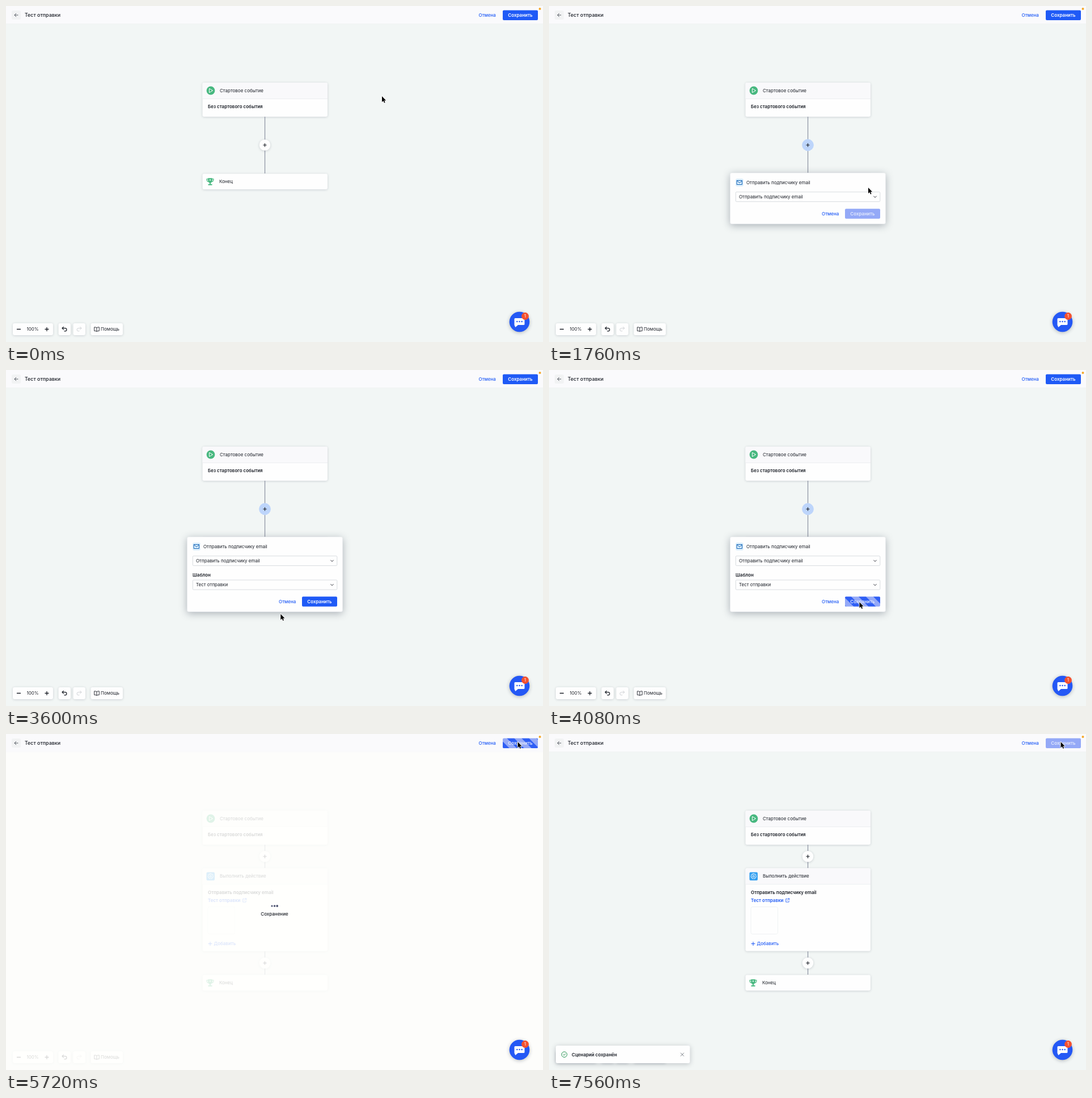
An HTML page with a canvas that plays this animation: 947 by 592 pixels, repeating every 8000 ms.

```html
<!DOCTYPE html>
<html lang="ru">
<head>
<meta charset="utf-8">
<style>
html, body { margin: 0; width: 100%; height: 100%; overflow: hidden; background: #f2f6f5; }
canvas { display: block; }
</style>
</head>
<body>
<canvas id="stage" width="947" height="592"></canvas>
<script>
const ctx = document.getElementById('stage').getContext('2d');
const LOOP = 8000, INK = '#1b1f27', BLUE = '#1f5af6', PALE = '#94a9f7', GREEN = '#48b880', GREY = '#989ca4';

const ICON = {
  mail: 'M-4.5-3.5h9v7h-9zM-4.5-3 0 .6 4.5-3',
  person: 'M-2.1-2.4a2.1 2.1 0 1 0 4.2 0a2.1 2.1 0 1 0-4.2 0M-4 4.5c0-5 8-5 8 0',
  hook: 'M-1.6-2.6a1.6 1.6 0 1 0 3.2 0a1.6 1.6 0 1 0-3.2 0M-4.6 2.4a1.6 1.6 0 1 0 3.2 0a1.6 1.6 0 1 0-3.2 0M1.4 2.4a1.6 1.6 0 1 0 3.2 0a1.6 1.6 0 1 0-3.2 0M-.6-1-2.2 1M.6-1 2.2 1M-1.4 2.4h2.8',
  sms: 'M-4.5-4h9v7h-6.5l-2.5 1.8zM-2.4-.5h.8M-.4-.5h.8M1.6-.5h.8',
  bell: 'M-4 2.4c2-2 0-6.6 4-6.6s2 4.6 4 6.6zM-1 4.3h2',
  home: 'M-4.5-.5 0-4 4.5-.5V4h-9z',
  plus: 'M-3 0H3M0-3V3',
  minus: 'M-3 0H3',
  check: 'M-2 0-.5 1.5 2-1.5',
  pencil: 'M-1.4 1.4 1.4-1.4',
  cross: 'M-2.7-2.7 2.7 2.7M2.7-2.7-2.7 2.7',
  chevron: 'M-2.3-1.2 0 1.2 2.3-1.2',
  back: 'M3 0H-3M-.2-2.8-3 0-.2 2.8',
  undo: 'M-1.6-4.2-4-1.8-1.6.6M-4-1.8H1.3a2.6 2.6 0 0 1 0 5.2H0',
  redo: 'M1.6-4.2 4-1.8 1.6.6M4-1.8H-1.3a2.6 2.6 0 0 0 0 5.2H0',
  book: 'M0-2.6C-1-3.6-2.5-3.6-4.3-3.6V3C-2.5 3-1 3 0 4 1 3 2.5 3 4.3 3V-3.6C2.5-3.6 1-3.6 0-2.6V4',
  play: 'M-2.2-3.4 3.6 0-2.2 3.4z',
  gear: 'M-1.6 0a1.6 1.6 0 1 0 3.2 0a1.6 1.6 0 1 0-3.2 0M-1-4.7h2l.5 1.3 1.6-.4 1.1 1.3-.6 1.5 1.2 1-.8 2-1.4.2-.1 1.5-1.5.8-1-1-1 1-1.5-.8-.1-1.5-1.4-.2-.8-2 1.2-1-.6-1.5 1.1-1.3 1.6.4z',
  external: 'M-.5-2.5h-2.3v5.6h5.4V1M.8-3.2h2.4V-.8M3-3-.5.5',
  cup: 'M-3.8-6.2h7.6v4c0 2.6-1.5 4-2.9 4.4v2h2.6v2h-7v-2h2.6v-2c-1.4-.4-2.9-1.8-2.9-4.4z',
  handles: 'M-3.6-4.6H-6c0 3 1 4.4 3.2 4.6M3.6-4.6H6c0 3-1 4.4-3.2 4.6',
  bubble: 'M-7.5-7h15a1.5 1.5 0 0 1 1.5 1.5v9a1.5 1.5 0 0 1-1.5 1.5h-10l-4.8 4-1.7-4v-10.5a1.5 1.5 0 0 1 1.5-1.5z',
  arrow: 'M0 0V10.3L2.4 8.1 4 11.8 5.6 11.1 4 7.5H7.2z',
  hand: 'M-.9.9C-.9-.3 1-.3 1 .9V4.2C1.3 3.6 2.7 3.6 2.8 4.6 3.2 4 4.5 4.1 4.6 5.1 5.1 4.7 6.1 4.9 6.1 5.9V8C6.1 9.4 5.2 10 5 11H-.1C-.5 9.7-2-.0-3 7.4-4 6.3-2.9 5.3-1.9 6.2L-.9 7z'
};

const MENU = [
  ['Отправить подписчику email', 'mail'],
  ['Отправить email подтверждения', 'mail', '#2f9e44', 'check'],
  ['Добавить в список', 'person', '#2f9e44', 'plus'],
  ['Изменить данные подписчика', 'person', '#1b4fd0', 'pencil'],
  ['Исключить из списка', 'person', '#e0453a', 'minus'],
  ['Вызвать Webhook', 'hook'],
  ['Отправить SMS', 'sms'],
  ['Отправить Web Push уведомление', 'bell']
];

const TEMPLATES = [
  ['Тест отправки', '362'],
  ['Новый шаблон 13.02.2024, 22:29:04', '351'],
  ['oru1: письмо с данными послед...', '251', 'сделки', 510],
  ['oru2: письмо с данными всех ак...', '253', 'сделок', 508.5]
];

// Pointer path: time, x, y
const PATH = [
  [0, 663, 159], [120, 663, 159], [680, 456, 241], [1020, 456, 241], [1560, 563, 320],
  [2140, 563, 320], [2360, 446.5, 375], [2860, 446.5, 375], [3180, 410, 424], [3460, 410, 424],
  [3600, 484, 430], [3860, 547.5, 409], [4460, 547.5, 409], [4800, 858, -1], [4960, 925, 3],
  [5240, 902.5, 14], [8000, 902.5, 14]
];

const progress = (t, a, b) => Math.min(1, Math.max(0, (t - a) / (b - a)));

function text(s, x, y, { color = INK, weight = 400, size = 8, align = 'left' } = {}) {
  ctx.font = `${weight} ${size}px Inter, sans-serif`;
  ctx.textAlign = align;
  ctx.fillStyle = color;
  ctx.fillText(s, x, y + size * .36);
}

function box(x, y, w, h, fill, { r = 2.5, border, line = .8, shadow } = {}) {
  ctx.save();
  ctx.beginPath();
  ctx.roundRect(x, y, w, h, r);
  if (shadow) {
    ctx.shadowColor = `rgba(30,40,60,${shadow[1]})`;
    ctx.shadowBlur = shadow[0];
    ctx.shadowOffsetY = shadow[0] / 5;
  }
  ctx.fillStyle = fill;
  ctx.fill();
  ctx.shadowColor = 'transparent';
  if (border) {
    ctx.strokeStyle = border;
    ctx.lineWidth = line;
    ctx.stroke();
  }
  ctx.restore();
}

const circle = (x, y, r, fill, options) => box(x - r, y - r, 2 * r, 2 * r, fill, { r, ...options });
const panel = (x, y, w, h, shadow = [4, .18]) => box(x, y, w, h, '#fefefe', { r: 3, shadow });
const rule = (x, y, w, color = '#e6e9ed') => box(x, y, w, .8, color, { r: 0 });

function icon(name, x, y, { color = INK, line = 1, fill, scale = 1 } = {}) {
  const shape = new Path2D(ICON[name]);
  ctx.save();
  ctx.translate(x, y);
  ctx.scale(scale, scale);
  ctx.lineJoin = ctx.lineCap = 'round';
  if (line) {
    ctx.strokeStyle = color;
    ctx.lineWidth = line;
    ctx.stroke(shape);
  }
  if (fill) {
    ctx.fillStyle = fill;
    ctx.fill(shape);
  }
  ctx.restore();
}

function button(x, y, state, t) {
  box(x, y, 62, 17.5, state === 'active' ? BLUE : PALE, { r: 2 });
  if (state === 'busy') {
    ctx.save();
    ctx.beginPath();
    ctx.roundRect(x, y, 62, 17.5, 2);
    ctx.clip();
    ctx.fillStyle = '#2f5ff5';
    const shift = (t * .026) % 26;
    for (let s = x - 26 - shift; s < x + 88; s += 26) {
      ctx.beginPath();
      ctx.moveTo(s, y);
      ctx.lineTo(s + 13, y);
      ctx.lineTo(s + 30.5, y + 17.5);
      ctx.lineTo(s + 17.5, y + 17.5);
      ctx.fill();
    }
    ctx.restore();
  }
  const color = state === 'active' ? '#fff' : '#e4eafd';
  text('Сохранить', x + 31, y + 8.7, { color, weight: 600, align: 'center' });
}

function addPoint(y, active) {
  circle(456.5, y, active ? 10.4 : 9.8, active ? '#bdd5fb' : '#fefefe', active ? {} : { shadow: [4, .2] });
  icon('plus', 456.5, y, { line: 1.3, scale: .9 });
}

function connector(y1, y2, active) {
  box(455.9, y1, 1.3, y2 - y1, '#9298a6', { r: 0 });
  addPoint((y1 + y2) / 2, active);
}

function headedCard(y, h, title) {
  panel(346.5, y, 220.5, h);
  box(346.5, y, 220.5, 28, '#f9f9fb', { r: [3, 3, 0, 0] });
  rule(346.5, y + 28, 220.5);
  text(title, 377, y + 14);
}

function endCard(y) {
  panel(346.5, y, 220.5, 27.5);
  icon('cup', 360, y + 14, { line: 0, fill: GREEN });
  icon('handles', 360, y + 14, { color: GREEN, line: 1.2 });
  circle(360, y + 11, 1.3, '#d9f3e5');
  text('Конец', 376, y + 14);
}

function flow(saved, active) {
  headedCard(135, 60, 'Стартовое событие');
  circle(361, 149, 7.4, GREEN);
  icon('play', 361, 149, { color: '#fff' });
  text('Без стартового события', 356, 177, { weight: 600 });
  if (!saved) {
    connector(195, 295, active);
    return endCard(295.5);
  }
  connector(195, 236.5);
  headedCard(236.5, 146, 'Выполнить действие');
  box(353.5, 243.5, 14.5, 14.5, '#34a0f0', { r: 2 });
  icon('gear', 360.8, 250.8, { color: '#fff', line: .9 });
  text('Отправить подписчику email', 356, 279, { weight: 600 });
  text('Тест отправки', 356, 293, { color: BLUE, weight: 600 });
  icon('external', 420.5, 293, { color: BLUE, line: .8 });
  box(356, 304.5, 47.5, 48, '#fefefe', { r: 3, border: '#edf0f1' });
  icon('plus', 360, 369.5, { color: BLUE, line: 1.1 });
  text('Добавить', 366.5, 369.5, { color: BLUE, weight: 500 });
  connector(383, 424, false);
  endCard(424.5);
}

function toolbar() {
  for (const [x, w] of [[12, 71], [92.5, 21.5], [118.5, 21.5], [149.5, 56.5]]) panel(x, 559, w, 21);
  icon('minus', 22.5, 569.5, { line: 1.3 });
  text('100%', 47, 569.5, { align: 'center' });
  icon('plus', 72, 569.5, { line: 1.3 });
  icon('undo', 103, 569.5, { line: 1.2 });
  icon('redo', 129, 569.5, { color: '#cfd2d6' });
  icon('book', 160, 569.5, { line: .9 });
  text('Помощь', 167, 569.5);
}

function header(state, t) {
  box(0, 0, 947, 31.5, '#fafafc', { r: 0 });
  box(10, 8, 16, 16, '#f2f3f4');
  icon('back', 18, 16, { color: '#555a63' });
  text('Тест отправки', 33, 16, { weight: 500, size: 8.9 });
  text('Отмена', 833.5, 16, { color: BLUE, weight: 500 });
  button(876, 7.5, state, t);
  circle(941.5, 5, 2, '#f5a826');
}

function chat() {
  circle(905.5, 556.5, 17.8, '#2458f5', { shadow: [6, .3] });
  icon('bubble', 905.5, 557, { line: 0, fill: '#fff' });
  for (const dx of [-4.2, 0, 4.2]) circle(905.5 + dx, 556, 1.25, '#2458f5');
  circle(915.5, 546.5, 6.4, '#f4512f');
  text('1', 915.5, 546.5, { color: '#fff', align: 'center' });
}

function search(x, y, w) {
  box(x, y, w, 17.5, '#fff', { border: '#c9d6fc', line: 3 });
  box(x, y, w, 17.5, '#fff', { border: '#5c80f0', line: 1.2 });
  text('Поиск', x + 5, y + 9, { color: GREY });
  box(x + 4.6, y + 4.2, .8, 9, INK, { r: 0 });
}

function tile(name, x, y, color = '#1766b8', back = '#d9edfb') {
  box(x - 6.8, y - 6.8, 13.6, 13.6, back);
  icon(name, x, y, { color });
}

function tooltip() {
  panel(368, 235.5, 71, 20, [5, .25]);
  text('Добавить блок', 373.5, 245.5);
  ctx.fillStyle = '#fefefe';
  ctx.fill(new Path2D('M439 242.5l3 3-3 3z'));
}

function menu() {
  panel(353, 262, 215.5, 246.5, [7, .28]);
  ctx.save();
  ctx.beginPath();
  ctx.rect(353, 262, 215.5, 246.5);
  ctx.clip();
  search(356.5, 265.2, 208.5);
  text('Действия', 362, 298.5, { weight: 600 });
  box(358, 308, 205.5, 19, '#f4f4f5', { r: 1 });
  MENU.forEach(([label, name, badge, mark], i) => {
    const y = 318 + i * 20.7, off = i === 7;
    ctx.globalAlpha = off ? .55 : 1;
    tile(name, 369.5, y);
    if (badge) {
      circle(373, y + 3.6, 3.2, badge);
      icon(mark, 373, y + 3.6, { color: '#fff', line: 1.2, scale: mark === 'check' ? .75 : .6 });
    }
    text(label, 381, y);
  });
  ctx.globalAlpha = 1;
  rule(353, 477.3, 215.5);
  text('События', 362, 490.5, { weight: 600 });
  tile('home', 369.5, 510, '#d9711c', '#fde6d3');
  text('Подписчик открыл email', 381, 510);
  ctx.restore();
}

function select(y, label, fill = '#fefefe') {
  box(329.3, y, 254.5, 17, fill, { r: 1.5, border: '#cfd3d8' });
  text(label, 335, y + 8.6);
  icon('chevron', 575, y + 8.6, { line: .9 });
}

function form(full, chosen, state, t) {
  const dy = full ? 0 : -42;
  panel(319.5, 294, 274, 132 + dy, [14, .35]);
  box(319.5, 294, 274, 132 + dy, '#fefefe', { r: 3, border: '#e2e5e8', line: .5 });
  tile('mail', 336, 311);
  text('Отправить подписчику email', 348, 311);
  select(327.7, 'Отправить подписчику email');
  if (full) {
    text('Шаблон', 329, 360.7, { weight: 600 });
    select(370, chosen ? 'Тест отправки' : '', chosen ? '#fefefe' : '#e3e3e3');
  }
  text('Отмена', 481, 408 + dy, { color: BLUE, weight: 500 });
  button(522, 399.3 + dy, state, t);
}

function templates(hover) {
  panel(329.3, 388, 207.2, 139, [5, .28]);
  search(332.5, 390.3, 201);
  box(500, 394, 30, 10, '#e2e3e8', { r: 1.5 });
  text('Enter↩', 503, 399, { size: 7.4 });
  if (hover) box(333, 415, 199, 19, '#f4f4f5', { r: 1 });
  TEMPLATES.forEach(([label, id, tail, right], i) => {
    const y = 425 + i * 20.7;
    text(label, 338, y);
    if (tail) text(tail, right, y, { align: 'right' });
    text(id, 527.5, y, { color: GREY, size: 7, align: 'right' });
  });
  icon('plus', 344, 514, { line: .8 });
  text('Создать шаблон', 353, 514);
}

function savingVeil(alpha, t) {
  ctx.save();
  ctx.globalAlpha = alpha;
  box(0, 31, 947, 561, 'rgba(255,255,253,.83)', { r: 0 });
  for (let i = 0; i < 3; i++) {
    const pulse = .5 + .5 * Math.cos((t - 6720) / 180 - (i - 1) * .7);
    circle(469 + i * 4.6, 303, 1.1 + .8 * pulse, '#4f5573');
  }
  text('Сохранение', 473.5, 317, { weight: 500, align: 'center' });
  ctx.restore();
}

function toast(p) {
  const y = 549 + 45 * (1 - p) ** 3;
  panel(12, y, 236.5, 31, [8, .25]);
  circle(27, y + 15.7, 4.8, '#fefefe', { border: '#22924f', line: 1 });
  icon('check', 27, y + 15.7, { color: '#22924f' });
  text('Сценарий сохранён', 40, y + 15.7, { weight: 600 });
  icon('cross', 235, y + 15.7, { color: '#6d727a', line: .9 });
}

// Cubic path that comes to rest wherever the pointer pauses
function pointerAt(t) {
  const i = Math.max(0, PATH.findIndex(p => p[0] > t) - 1);
  const a = PATH[i], b = PATH[i + 1], span = b[0] - a[0], u = (t - a[0]) / span;
  const still = (p, q) => !p || !q || (p[1] === q[1] && p[2] === q[2]);
  const slope = (k, axis) => {
    const p = PATH[k - 1], n = PATH[k + 1];
    if (still(p, PATH[k]) || still(PATH[k], n)) return 0;
    return (n[axis] - p[axis]) / (n[0] - p[0]) * span;
  };
  return [1, 2].map(axis =>
    a[axis] + (b[axis] - a[axis]) * u * u * (3 - 2 * u) +
    slope(i, axis) * u * (1 - u) ** 2 - slope(i + 1, axis) * u * u * (1 - u));
}

function pointer(t, x, y) {
  const inside = (l, top, r, bottom) => x > l && x < r && y > top && y < bottom;
  const hand =
    t < 1640 ? inside(446, 234, 467, 256) || (t > 1040 && inside(358, 308, 564, 328)) :
    t < 3240 ? inside(329, 327, 584, 345) || inside(329, 370, 584, 388) || inside(333, 414, 532, 500) :
    t < 3960 ? inside(522, 399, 584, 417) || inside(481, 400, 512, 416) :
    t > 4480 && t < 5320 && (inside(876, 7, 938, 25) || inside(833, 9, 865, 23));
  if (hand) icon('hand', x, y, { color: '#111', line: 1.5, fill: '#fff' });
  else icon('arrow', x, y, { color: '#fff', line: 1.6, fill: '#000' });
}

function draw(t) {
  const [x, y] = pointerAt(t);
  const during = (a, b) => t >= a && t < b;
  const overAdd = t < 1640 && Math.hypot(x - 456.5, y - 245) < 11;
  const saved = t >= 4240;

  ctx.fillStyle = '#f2f6f5';
  ctx.fillRect(0, 0, 947, 592);
  flow(saved, overAdd || during(760, 4240));
  toolbar();

  if (overAdd) tooltip();
  if (during(760, 1640)) menu();
  if (during(1640, 4240)) {
    const chosen = t >= 3240;
    form(t >= 1880, chosen, t >= 3960 ? 'busy' : chosen ? 'active' : 'off', t);
  }
  if (during(2600, 3240)) templates(y > 414);

  const veil = progress(t, 5360, 5600) * (1 - progress(t, 7000, 7240));
  rule(0, 31.3, 947, '#e4e9ea');
  if (veil) savingVeil(veil, t);
  header(t < 5320 ? 'active' : t < 7040 ? 'busy' : 'off', t);
  if (t > 7160) toast(progress(t, 7160, 7560));
  chat();
  pointer(t, x, y);
}

function tick(now) {
  draw(now % LOOP);
  requestAnimationFrame(tick);
}
requestAnimationFrame(tick);
</script>
</body>
</html>
```
